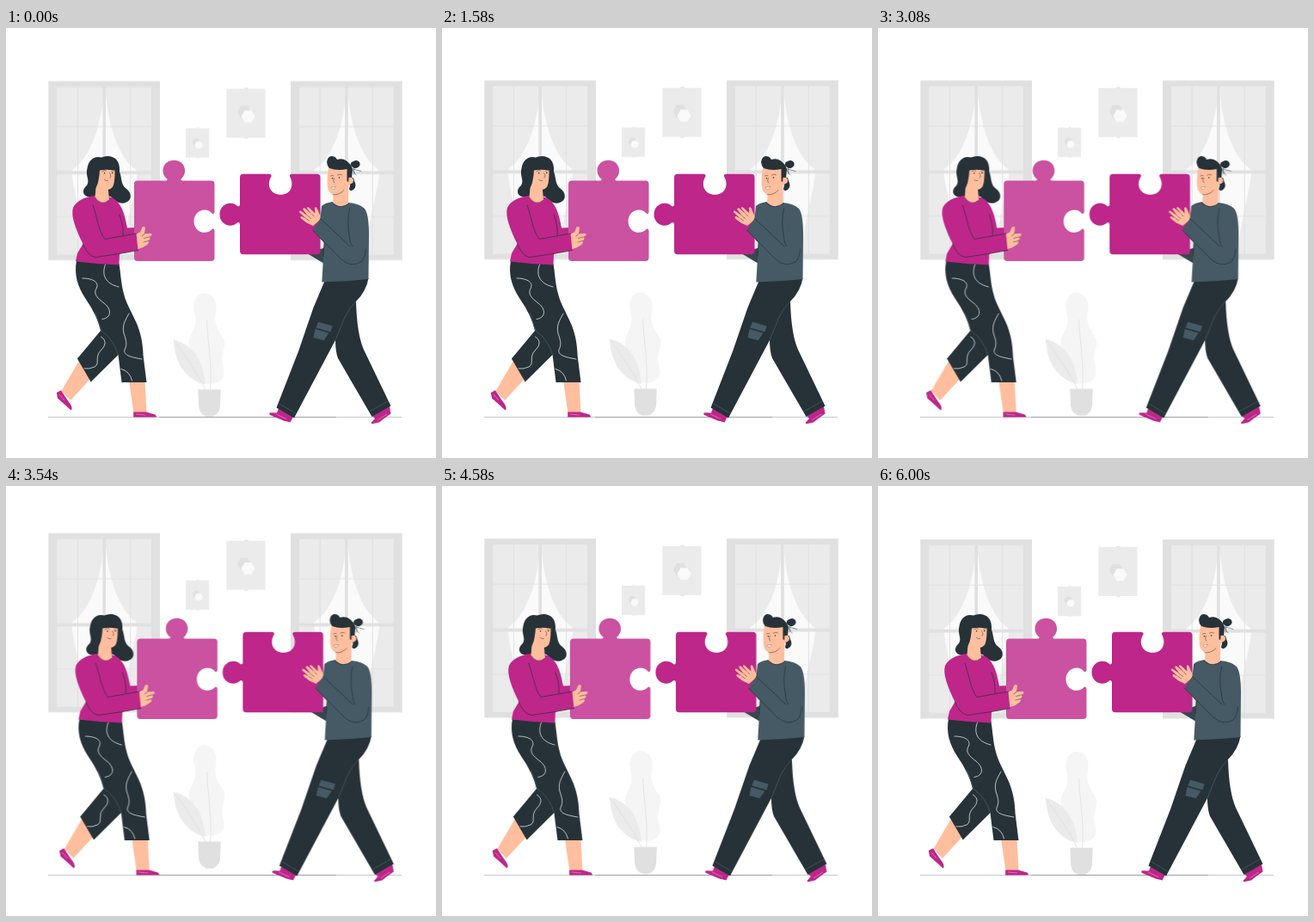
An HTML page for the animation above (6.04 s loop, 500x500 px).

```html
<!DOCTYPE html>
<html lang="en">
<head>
<meta charset="utf-8">
<title>Puzzle partners</title>
<style>
  html, body { margin: 0; width: 100%; height: 100%; overflow: hidden; background: #fff; }
  svg { display: block; width: 100vw; height: 100vh; }
  .room { animation: float 1510ms linear -34ms infinite; }
  .team { animation: shake 6040ms linear -34ms infinite; }
  @keyframes float { 50% { transform: translateY(-10px); } }
  @keyframes shake {
    10%, 90% { transform: translateX(-1px); }
    20%, 80% { transform: translateX(2px); }
    30%, 50%, 70% { transform: translateX(-4px); }
    40%, 60% { transform: translateX(4px); }
  }
  .pink { fill: #be268a; }
  .light { fill: #cb51a1; }
  .dark { fill: #263238; }
  .slate { fill: #455a64; }
  .skin { fill: #ffbe9d; }
  .g1 { fill: #e0e0e0; }
  .g2 { fill: #ebebeb; }
  .g3 { fill: #f5f5f5; }
  .g4 { fill: #fafafa; }
  .line { fill: none; stroke: #263238; stroke-width: .7; stroke-linecap: round; stroke-linejoin: round; }
  .thin { stroke-width: .5; }
  .floor { fill: none; stroke: #263238; stroke-width: .6; stroke-opacity: .45; }
  .wave { fill: none; stroke: #fff; stroke-width: .7; stroke-linecap: round; }
  .seam { fill: none; stroke: #56707c; stroke-width: .5; }
  .bar { fill: none; stroke: #e0e0e0; }
  .shine { fill: none; stroke: #f0b5d8; stroke-width: .5; }
</style>
</head>
<body>
<svg viewBox="0 0 500 500">
  <defs>
    <g id="window">
      <path class="g1" d="M49.300 62.300H179V270.600H49.300Z"/>
      <path class="g2" d="M59.300 69H169V264H59.300Z"/>
      <path class="g4" d="M113.800 69.500C112 112 99 150 77 165.500L76.500 170C80 200 90 225 92 264H137C139 225 149 200 152.500 170L151.500 165.500C130 150 118 112 115.500 69.500Z"/>
      <path class="bar" stroke-width=".9" d="M83.500 69V264M144.700 69V264M59 115.200H169M59 220H169"/>
      <path class="bar" stroke-width="3.600" d="M114.200 69V264M56 168.600H172"/>
    </g>
    <path id="hex" d="M-8 0L-4 -7H4L8 0 4 7H-4Z"/>
    <g id="picture">
      <path class="g2" d="M256.300 71H301.500V128H256.300Z"/>
      <path class="g1" d="M276.500 71Q279.500 68.700 282.500 71ZM276.500 128Q279.500 130 282.500 128Z"/>
      <use href="#hex" class="g1" x="277" y="98"/>
      <use href="#hex" class="g4" x="281.500" y="103.300"/>
    </g>
  </defs>

  <g class="room">
    <use href="#window"/>
    <use href="#window" x="281.700"/>
    <use href="#picture"/>
    <use href="#picture" transform="translate(55.200 74.400) scale(.6)"/>
    <path class="g3" d="M231 309C222 308 216 320 219 331C222 343 220 348 215 358C210 367 216 374 213 384C211 396 220 406 233 414H238C248 414 256 408 253 396C250 386 251 382 254 371C257 360 246 356 244 344C242 334 246 329 244 320C242 313 237 309 231 309Z"/>
    <path class="g2" d="M195 363C213 367 229 382 232 415C215 412 196 396 195 363Z"/>
    <path class="bar" stroke-width=".8" d="M233.500 340C235 370 240 395 237.500 421M195 363Q218 394 232 421"/>
    <path class="g1" d="M223.300 420.800H249.700L249 441Q247 452.300 236.500 452.300Q226 452.300 224.200 441Z"/>
  </g>

  <path class="floor" d="M49 452.500H460M178 452.500H384"/>

  <g class="team">
    <!-- woman: hair and far arm -->
    <path class="dark" d="M118 149Q114 149 111 150.500C102 148 96 154 94.500 163C92 172 98 177 94 183C87 189 90 196 97 196.500C108 198 118 194 122 196C127 203 135 205.500 140 202.500C147 200 146 191 140 187C133 182 135 174 132 167C133 155 127 149 118 149Z"/>
    <path class="pink" d="M131 204C137 212 139 222 141 232.500L152 232V244L130 247Z"/>

    <!-- woman: legs -->
    <path class="skin" d="M85 387L64.500 422 75 433 98 408ZM143 410L148.500 448H163.500L161.500 410Z"/>
    <path class="pink" d="M64 421.300L58.800 424 60 430.500 69 438.500 75.500 444.500Q78 443 75 437.500L70 430.500ZM148.200 446.500H163L173.500 449.500Q176 452 174 452.500H148.200Z"/>
    <path class="shine" d="M62 426L68 433M151 449L162 450"/>
    <path class="dark" d="M82 271C79 286 83 300 92 314Q106 334 110 352L82.900 384.500 98.700 411.500 130.500 380 134.500 412H163.500L159.700 382C159 368 158 360 153 346C147 332 139 319 137 309C134 299 133.500 287 131.500 274Z"/>
    <path class="seam" d="M104 331L111 352Q126 363 130.500 380"/>
    <path class="wave" d="M115.500 275C111 287 115 297 131 301M89 291C100 291 108 295 105.500 302C101 309 106 314 114 320C123 327 123 337 112 338.500M143 332C138 341 135 346 137 355C140 364 141 368 138 374C136 381 147 383 158 385M110.500 359C117 363 116 369 111 374C102 383 110 390 103 394Q97 397 91 396M134 396.500Q144 399 146.500 410"/>

    <!-- left piece -->
    <path class="light" d="M153 177.500H185.500Q188 177.500 187.500 175.500C178.500 169 182 153.700 195.400 153.700C208.500 153.700 212 169 203.500 175.500Q203 177.500 205.500 177.500H238.500Q242.500 177.500 242.500 181.500V213.500Q242.500 216.500 240 216C233 207 218.500 212 218.500 224.700C218.500 237.500 233 242 240 233.500Q242.500 233 242.500 236V267Q242.500 271 238.500 271H153Q149 271 149 267V181.500Q149 177.500 153 177.500Z"/>

    <!-- woman: body -->
    <path class="skin" d="M150 240L156 237.500 158.500 231.500Q161.500 230 162 232.500L160.800 239.500 168 238.800Q170.500 239.500 169 241.500L166 243Q168.500 243.500 167 246L165.500 247.500Q166.500 250.500 164 252L158.500 255.500 150 258Z"/>
    <path class="line thin" d="M160.800 239.500L158 242M166 243L160.500 244.500M165.500 247.500L160 249"/>
    <path class="pink" d="M104 195C91 196 81 202 78 209C75 218 81 234 89.500 251L83 262 81 271.500Q105 274.500 131.500 275.500L132 262.500 153.500 258.500 151.500 239 140 241C139 226 137 213 130 202.500Q126 197.500 119 196Z"/>
    <path class="line" d="M101 206C106 220 108 237 115 245.500L151.500 239M132 262.500L153.500 258.500M132 217Q137 230 136 241M89.500 251Q95 265 104 266.500L132 262.500"/>
    <path class="skin" d="M105 180L103.500 197Q111 208 120 200L118.500 184Z"/>
    <path class="line thin" d="M103.500 197Q111 208 120 200"/>
    <path class="skin" d="M107 162L105.500 177Q108 185 114 187.500Q121 189.500 124.500 184Q127 178 126.500 161L115 158Z"/>
    <path class="dark" d="M117 150Q128 151 130 160Q130 164 127.500 165.500Q116 164 109 165.500Q108 180 104.500 186Q96 180 99 167Q103 151 117 150Z"/>
    <path class="line thin" d="M112 166.500Q114 165 116.500 166M122.500 166Q124 165.200 125.500 166M120.500 168.500Q123.500 173.500 120.800 174M114.500 176.500Q116.500 178.500 118.500 177.500"/>
    <circle class="dark" cx="114.600" cy="168.700" r=".8"/>
    <circle class="dark" cx="123.800" cy="168.400" r=".8"/>

    <!-- man: far arm and legs -->
    <path d="M350 262L372 255 370 274Z" fill="#37474f"/>
    <path class="pink" d="M317 442L334 452 330.500 458.500 322.500 456.500 307 450Q305 447.500 308 447.300L315 447.500ZM426 451L446 440 447.500 448.500 439 454.500 434 458.500 426 460.300Q423.500 460 426 457.500L429 454Z"/>
    <path class="shine" d="M314 449L326 454.500M432 456L443 449"/>
    <path class="dark" d="M371 293L357.500 325 340 376 314.500 441.500 335 453.500 383 363Q383 376 386 384L425.500 452 447.500 439.500 416 374Q408 356 407 318Q419 306 421.500 291Z"/>
    <path class="seam" d="M318 437L337.500 448.500M422.500 446L444 434M407 318Q400 324 394 336L383 363"/>
    <path class="slate" d="M363 341.800L379.700 346.500 377.500 353.500 360.300 348.500ZM359.500 350L375.500 354.700 369.500 363.200 357.500 360Z"/>

    <!-- right piece -->
    <path class="pink" d="M276 169.800H305.500Q309 169.800 308.500 172.500C302 183 308 193.800 319.300 193.800C331 193.800 336 183 330 172.500Q329.500 169.800 333 169.800H361.500Q365.500 169.800 365.500 173.800V259.300Q365.500 263.300 361.500 263.300H276Q272 263.300 272 259.300V228.500Q272 225.500 269.500 226C262 233.500 248.500 229 248.500 216.700C248.500 204.500 262 200 269.500 207.300Q272 208 272 205V173.800Q272 169.800 276 169.800Z"/>

    <!-- man: body -->
    <path class="skin" d="M357 230L349.500 226.500 343 221.500Q341.500 219 344 219L349 221.500 341.200 214.500Q340 212 343 212.800L351 218.500 345.300 211Q345.500 208.300 348 210L356 217 349.800 209.500Q350.500 207.500 352.500 209L359.500 215.500 358.800 209.500Q360.500 207 361.800 210L365 217.500 366.500 222Z"/>
    <path class="line thin" d="M349 221.500L352.500 224M351 218.500L354.500 221.500M356 217L358 219"/>
    <path class="slate" d="M381 202Q371 203 367 207L365.500 221.500 356.500 235 370 250 367.300 295.500Q395 295 421.500 292L422 240Q422 217 417 210Q411 204 397 203Z"/>
    <path class="line" d="M365.500 221.500L400 254M356.500 235L390 269Q401 279 413 272Q418 267 418.500 257M399.500 210Q396 226 399.500 243Q401 254 403 254M378.500 203Q388 212 399 204M370 250L369 265"/>
    <path class="skin" d="M381 188L380 203Q389 211 398 204L398.500 178Z"/>
    <path class="skin" d="M375.500 161Q373 171 373.800 184Q375 193 382 194Q391 194 397 183L403 182.500Q406 178 402.500 173.500L398 160Z"/>
    <path class="line thin" d="M380 193.800Q388 194.500 393 188.500"/>
    <path class="dark" d="M376 163Q371.500 158 374 152.500Q376 147.500 381.500 149.500Q383.500 150 385 153Q391 151 396 154.500Q401 158 403 164L402 175Q404 172 405 178Q408 183 405 187Q401 191 399 187.500L400.500 181 396.500 178V164Q385 166.500 376 163Z"/>
    <path class="skin" d="M398.500 174Q404 173 404 178Q403 182 398 181Z"/>
    <path class="dark" d="M401 160Q400 156 404 155Q408 152.500 411 156Q413 160 408.500 162.500Q405 165 401 160Z"/>
    <path class="line thin" d="M400 163L413 166.500M401 162L407 171M404.500 162V170"/>
    <path class="line thin" d="M377.500 172Q379 170.800 381 171.800M385.500 171Q388 169.300 390.500 170.800M381.500 174.500Q379.500 179 382 180"/>
    <circle class="dark" cx="379.500" cy="174.800" r=".8"/>
    <circle class="dark" cx="387.500" cy="174" r=".8"/>
    <path d="M378 185.200Q380.500 185.500 383.500 184Q382.500 188 379.500 187.500Z" fill="#fff" stroke="#263238" stroke-width=".3"/>
  </g>
</svg>
</body>
</html>
```
